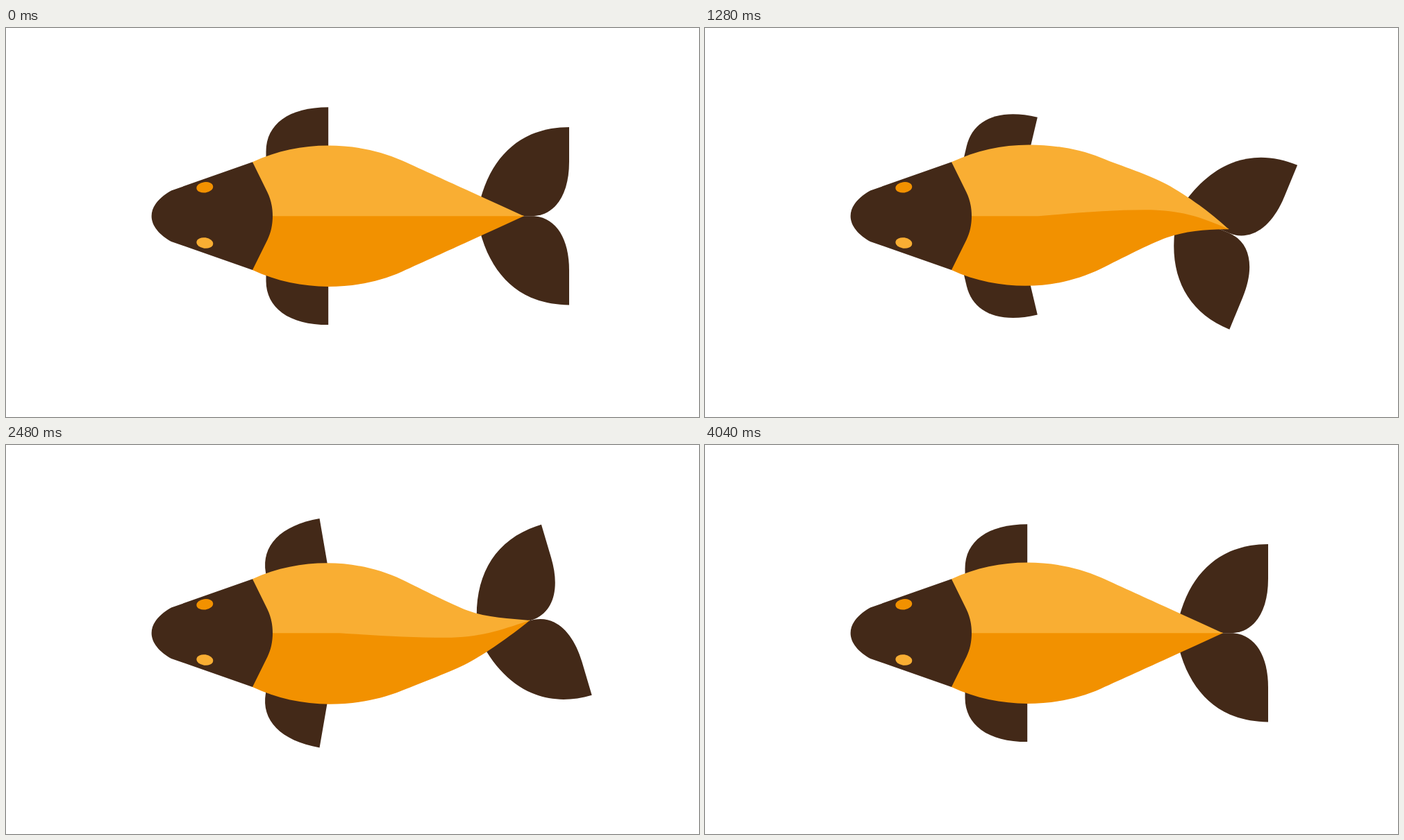
Recreate the animation shown at these times as an HTML page. Size 998 by 561 pixels, loop 5 s.

```html
<!DOCTYPE html>
<html lang="en">
<head>
<meta charset="utf-8">
<title>Swimming fish</title>
<style>
  html, body { margin: 0; width: 100%; height: 100%; overflow: hidden; background: #fff; }
  svg { display: block; width: 100%; height: 100%; }
  .brown { fill: #432918; }
  .light { fill: #f9ae33; }
  .orange { fill: #f29100; }
</style>
</head>
<body>
<svg viewBox="0 0 998 561">
  <defs>
    <path id="tailFin" d="M811 143V193C811 240 791 271.2 757 271.2H678C691 191 737 143 811 143Z"/>
    <path id="sideFin" d="M464.2 114.3V200H374.5V178C374.5 139 407 114.3 464.2 114.3Z"/>
  </defs>
  <g id="tail" class="brown">
    <use href="#tailFin"/>
    <use href="#tailFin" transform="matrix(1 0 0 -1 0 542.4)"/>
  </g>
  <g class="brown">
    <use id="finTop" href="#sideFin"/>
    <g transform="matrix(1 0 0 -1 0 542.4)"><use id="finBottom" href="#sideFin"/></g>
  </g>
  <path id="lower" class="orange"/>
  <path id="upper" class="light"/>
  <path class="brown" d="M355 193.3L376.5 237C381.5 247 384 259 384 271.2S381.5 295.4 376.5 305.4L355 349.1L238 307.9C221 298.4 209.6 285.4 209.6 271.2S221 244 238 234.5Z"/>
  <ellipse class="orange" cx="286.3" cy="229.8" rx="12" ry="7.7" transform="rotate(-8 286.3 229.8)"/>
  <ellipse class="light" cx="286.3" cy="310" rx="12" ry="7.7" transform="rotate(8 286.3 310)"/>
</svg>
<script>
const LOOP = 5000, STEP = 40, AXIS = 271.2, MAX_ANGLE = 25;
const RIGHT = 1005, LEFT = 3005, REST = 4040;
const el = id => document.getElementById(id);

const ease = (t, from, to) => {
  const u = Math.min(1, Math.max(0, (t - from) / (to - from)));
  return u * u * (3 - 2 * u);
};

// Swing of the tail, from -1 to 1
const swingAt = t => ease(t, 0, RIGHT) - 2 * ease(t, RIGHT, LEFT) + ease(t, LEFT, REST);

const mirror = points => points.map(([x, y]) => [x, 2 * AXIS - y]);

// Upper outline of the body as cubic Bezier points, head to tail tip
function outline(q, [tipX, tipY]) {
  const shoulder = 191 - 4.5 * q;
  const hip = 234.2 - 8.2 * q - 1.8 * q * q;
  const slope = 0.455 + 0.1 * q;
  const endSlope = 0.455 + 0.53 * q;
  const top = 169.5 - 1.2 * q;
  return [
    [355, 193.3], [390, 177], [427, top], [464 + 3 * q, top],
    [501, top], [537, 176.5 - 3 * q], [570, shoulder],
    [600, shoulder + 30 * (0.455 - 0.05 * q)], [640, hip - 25 * slope], [665, hip],
    [692, hip + 27 * slope], [tipX - 28, tipY - 28 * endSlope], [tipX, tipY]
  ];
}

function spine(q, [tipX, tipY], lift = 0) {
  const crest = AXIS - 10 * q;
  return [
    [355, AXIS], [400, AXIS], [440, AXIS], [480, AXIS],
    [535, AXIS - 5 * q], [583, crest], [633, crest],
    [683, crest], [tipX - 42, tipY - 21 * q], [tipX, tipY]
  ].map(([x, y]) => [x, y - lift]);
}

const curve = points => points[0] + 'C' + points.slice(1).join(' ');
const enclose = (a, b) => `M${curve(a)}L${curve([...b].reverse())}Z`;

function draw(t) {
  const q = swingAt(t);
  const angle = MAX_ANGLE * q;
  const rad = angle * Math.PI / 180;
  const tailX = 721 + 90 * Math.cos(rad);
  const tailY = AXIS + 118 * Math.sin(rad);
  el('tail').setAttribute('transform',
    `translate(${tailX} ${tailY}) rotate(${angle}) translate(-811 ${-AXIS})`);

  for (const id of ['finTop', 'finBottom'])
    el(id).setAttribute('transform', `rotate(${0.595 * angle} 409.5 184)`);

  const stretch = ease(t, 0, RIGHT) - ease(t, LEFT, REST);
  const tip = [745.7 + 8.5 * stretch, AXIS + 28.5 * q - 2.6 * q ** 2 - 6.2 * q ** 3];
  const belly = mirror(outline(-q, mirror([tip])[0]));
  // The lower half reaches slightly under the upper one to avoid a seam
  el('lower').setAttribute('d', enclose(belly, spine(q, tip, 0.8)));
  el('upper').setAttribute('d', enclose(outline(q, tip), spine(q, tip)));
}

const start = performance.now();
function tick() {
  const t = (performance.now() - start) % LOOP;
  draw(Math.floor(t / STEP) * STEP);
  requestAnimationFrame(tick);
}
tick();
</script>
</body>
</html>
```
